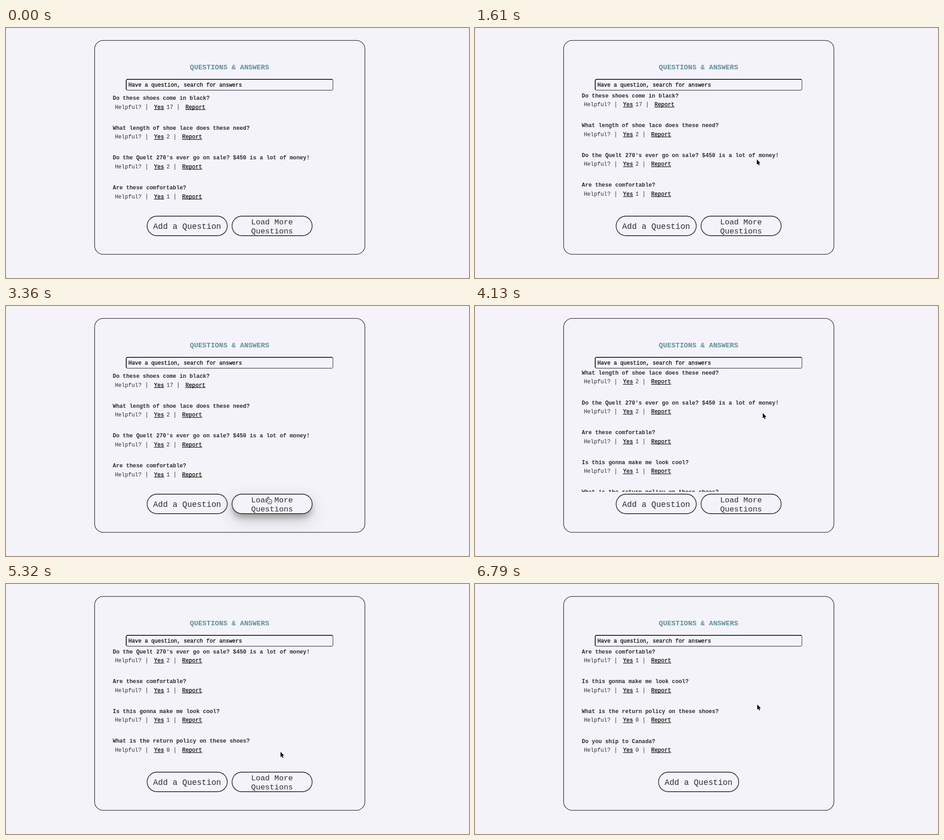
Recreate the animation shown at these times as an HTML page with a canvas. Size 1017 by 550 pixels, loop 8000 ms.

```html
<!DOCTYPE html>
<html lang="en">
<head>
<meta charset="utf-8">
<title>Questions &amp; Answers</title>
<style>
  html, body { margin: 0; width: 100%; height: 100%; overflow: hidden; background: #f4f3f9; }
  canvas { display: block; width: 1017px; height: 550px; }
</style>
</head>
<body>
<canvas id="stage" width="1017" height="550"></canvas>
<script>
const ctx = document.getElementById('stage').getContext('2d');
const LOOP = 8000, STEP = 70, ROW = 65.65;
const BG = '#f4f3f9', INK = '#2e2d34';

const questions = [
  ['Do these shoes come in black?', 17],
  ['What length of shoe lace does these need?', 2],
  ["Do the Quelt 270's ever go on sale? $450 is a lot of money!", 2],
  ['Are these comfortable?', 1],
  ['Is this gonna make me look cool?', 1],
  ['What is the return policy on these shoes?', 0],
  ['Do you ship to Canada?', 0],
];

// Each move: first step, last step, start value, end value.
const cursorMoves = [
  [420, 630, [533.4, 497], [619, 289]],
  [2450, 2800, [619, 289], [575.5, 424]],
  [3360, 3360, [575.5, 424], [576, 421]],
  [3430, 3640, [576, 421], [632, 235.5]],
  [4830, 5040, [632, 235.5], [610, 331]],
  [5180, 5670, [610, 331], [590, 441]],
  [5950, 6160, [590, 441], [620, 265]],
];
const scrollMoves = [
  [1540, 1610, [0], [5.5]],
  [2170, 2240, [5.5], [0]],
  [3990, 4340, [0], [136.8]],
  [6650, 6790, [136.8], [202.4]],
];
const clicks = [[910, 1050, 19.5], [3080, 3150, 27]];
const FIRST_LOAD = 3150, LAST_LOAD = 5810;

const arrow = new Path2D('M0 0V11.6L2.6 9.2L4.4 13.2L6.2 12.4L4.5 8.4H8Z');
const hand = new Path2D('M-1.3 6V.4Q-1.2-1 0-1Q1.3-1 1.4.4V4.4Q2.8 3.4 3.7 4.8' +
  'Q5.2 4 5.9 5.4Q7.8 5 7.8 7.2V9.5Q7.6 11.5 6.5 14H-.2Q-1.2 11.6-4 8.9Q-5 7.5-3.7 6.8Q-2.7 6.5-1.3 8Z');

function ease(p) {
  const q = p ** 0.94;
  return q * q * (3 - 2 * q);
}

function track(moves, t) {
  let value = null;
  for (const [start, end, from, to] of moves) {
    if (t < start) break;
    const p = ease(Math.min(1, (t - start + STEP) / (end - start + STEP)));
    value = from.map((v, i) => v + (to[i] - v) * p);
  }
  return value;
}

function text(str, x, y, size, color = INK, weight = 400, align = 'left') {
  ctx.font = `${weight} ${size}px "Liberation Mono", "Courier New", monospace`;
  ctx.textAlign = align;
  ctx.fillStyle = color;
  ctx.fillText(str, x, y);
}

// Black text, slightly heavier than regular.
function strongText(str, x, y, size) {
  text(str, x, y, size, '#000');
  ctx.strokeStyle = '#000';
  ctx.lineWidth = 0.25;
  ctx.strokeText(str, x, y);
}

function box(x, y, w, h, r) {
  ctx.beginPath();
  ctx.roundRect(x, y, w, h, r);
}

function outline(color, width) {
  ctx.strokeStyle = color;
  ctx.lineWidth = width;
  ctx.stroke();
}

function link(str, x, y) {
  strongText(str, x, y, 12.2);
  ctx.fillRect(x, y + 1.3, str.length * 7.32, 1.2);
}

function divider(x, y) {
  ctx.fillStyle = INK;
  ctx.fillRect(x - 0.4, y - 10, 1, 13);
}

function drawQuestion([title, votes], y) {
  const line = y + 19.6;
  const shift = String(votes).length * 7.32;
  text(title, 234.6, y, 12.22, INK, 700);
  text('Helpful?', 239.2, line, 12.2);
  divider(309, line);
  link('Yes', 325.2, line);
  text(votes, 352.6, line, 12.2);
  divider(363.6 + shift, line);
  link('Report', 379.6 + shift, line);
}

function drawList(scroll, count) {
  ctx.save();
  ctx.beginPath();
  ctx.rect(230, 141, 530, 268);
  ctx.clip();
  questions.slice(0, count).forEach((q, i) => drawQuestion(q, 158 + i * ROW - scroll));
  ctx.restore();
}

function drawSearch() {
  const x = 263.3, y = 112, w = 455.7, h = 25.7;
  box(x + 0.8, y + 0.8, w - 1.6, h - 1.6, 3.5);
  outline('#70707a', 1.6);
  ctx.save();
  ctx.beginPath();
  ctx.moveTo(x - 1, y + h + 1);
  ctx.lineTo(x + 13, y + 13);
  ctx.lineTo(x + w - 13, y + 13);
  ctx.lineTo(x + w + 1, y - 1);
  ctx.lineTo(x - 1, y - 1);
  ctx.clip();
  box(x + 0.8, y + 0.8, w - 1.6, h - 1.6, 3.5);
  outline('#17161c', 1.7);
  ctx.restore();
  strongText('Have a question, search for answers', 269, 129, 11.88);
}

function dropShadow(offset, blur, alpha) {
  ctx.save();
  ctx.shadowColor = `rgba(0,0,0,${alpha})`;
  ctx.shadowOffsetY = offset;
  ctx.shadowBlur = blur;
  ctx.fillStyle = BG;
  ctx.fill();
  ctx.restore();
}

function drawButton(x, lines, size, hovered) {
  box(x + 0.8, 413.9, 176, 43, 21.5);
  if (hovered) {
    dropShadow(13, 38, 0.19);
    dropShadow(9, 12, 0.24);
  }
  outline(INK, 1.6);
  lines.forEach((str, i) =>
    text(str, x + 88.7, 441.5 + (i - (lines.length - 1) / 2) * 20, size, INK, 400, 'center'));
}

function drawCursor(x, y, pointing) {
  ctx.save();
  ctx.translate(x, y);
  ctx.lineJoin = 'round';
  if (pointing) {
    ctx.fillStyle = '#fff';
    ctx.fill(hand);
    ctx.strokeStyle = '#111';
    ctx.lineWidth = 1;
    ctx.stroke(hand);
    ctx.beginPath();
    for (const fx of [1.3, 3.2, 5.1]) {
      ctx.moveTo(fx, 8.4);
      ctx.lineTo(fx, 11.6);
    }
    outline('#111', 0.7);
  } else {
    ctx.strokeStyle = '#fff';
    ctx.lineWidth = 1.6;
    ctx.stroke(arrow);
    ctx.fillStyle = '#000';
    ctx.fill(arrow);
  }
  ctx.restore();
}

function draw(t) {
  const cursor = track(cursorMoves, t);
  const [scroll] = track(scrollMoves, t) || [0];
  const allLoaded = t >= LAST_LOAD;
  const count = allLoaded ? 7 : t >= FIRST_LOAD ? 6 : 4;
  const over = x => cursor && cursor[0] > x && cursor[0] < x + 177 &&
    cursor[1] > 413 && cursor[1] < 458;

  ctx.fillStyle = BG;
  ctx.fillRect(0, 0, 1017, 550);
  ctx.fillStyle = '#77767c';
  for (const x of [0, 1016]) for (const y of [0, 549]) ctx.fillRect(x, y, 1, 1);

  box(194.6, 27.3, 593.8, 470.6, 19);
  outline(INK, 1.3);
  text('QUESTIONS & ANSWERS', 491, 91, 15.3, '#5f909c', 700, 'center');
  drawList(scroll, count);
  drawSearch();

  const addX = allLoaded ? 402.4 : 309.2;
  const moreX = 495.7;
  const hoverMore = !allLoaded && over(moreX);
  drawButton(addX, ['Add a Question'], 17.75, over(addX));
  if (!allLoaded) drawButton(moreX, ['Load More', 'Questions'], 17, hoverMore);

  if (!cursor) return;
  for (const [start, end, radius] of clicks) {
    if (t < start || t >= end) continue;
    ctx.beginPath();
    ctx.arc(...cursor, radius, 0, Math.PI * 2);
    outline('rgba(0,0,0,.75)', 1.5);
  }
  drawCursor(...cursor, hoverMore || over(addX));
}

function tick() {
  const t = performance.now() % LOOP;
  draw(Math.floor(t / STEP) * STEP);
  requestAnimationFrame(tick);
}
tick();
</script>
</body>
</html>
```
